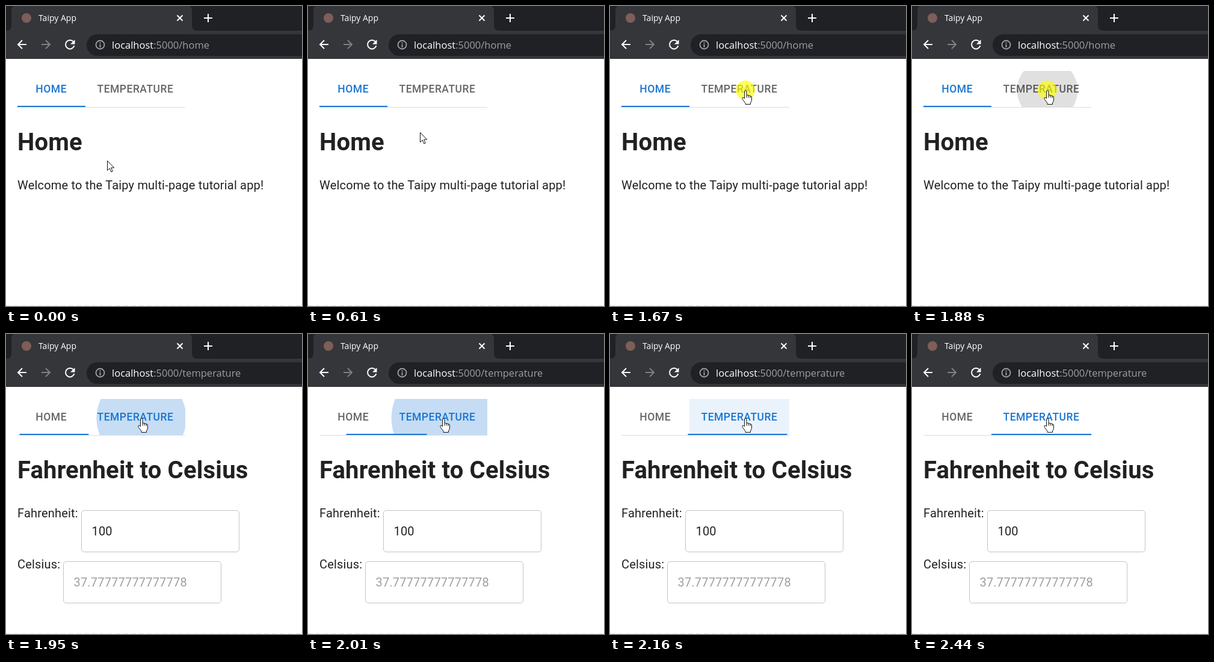
An HTML page that plays this animation: 492 px wide and 499 px high, repeating every 3630 ms.

```html
<!DOCTYPE html>
<html lang="en">
<head>
<meta charset="utf-8">
<title>Multi-page app</title>
<style>
  html, body { margin: 0; width: 100%; height: 100%; overflow: hidden; background: #fff; }
  svg { display: block; width: 492px; height: 499px; }
  text { white-space: pre; }
  .chrome { font-family: "Open Sans", "Noto Sans", sans-serif; fill: #fff; }
  .page { font: 20px Roboto, Arial, sans-serif; letter-spacing: .1875px; fill: #212121; }
  .page .title { font-size: 40px; font-weight: 700; }
  .page .muted { fill: #9e9e9e; }
  .tab { font: 500 17.5px Roboto, Arial, sans-serif; letter-spacing: .5px; }
  .line { fill: none; stroke: #fff; stroke-width: 2; }
  .field { fill: none; stroke: #c4c4c4; }
  .cursor { fill: #fff; stroke: #111; stroke-linejoin: round; }
</style>
</head>
<body>
<svg viewBox="0 0 492 499">
  <defs>
    <clipPath id="tabArea"><rect x="132" y="108" width="166" height="60"/></clipPath>
  </defs>

  <!-- browser frame -->
  <g class="chrome">
    <rect width="492" height="88" fill="#202124"/>
    <path fill="#35363a" d="M0 88V41Q9 41 9 32V8Q9 2 13 0H305Q309 2 309 8V32Q309 41 318 41H492V88Z"/>
    <circle cx="34" cy="20" r="8" fill="#7c5f58"/>
    <text x="54" y="25" font-size="14">Taipy App</text>
    <path class="line" d="M284.5 15.5l9 9m0-9l-9 9"/>
    <path class="line" stroke-width="2.5" d="M329 20h14m-7-7v14"/>
    <path class="line" d="M34 64H20m7-7l-7 7l7 7"/>
    <path class="line" style="stroke:#7f8083" d="M59 64h14m-7-7l7 7l-7 7"/>
    <path class="line" d="M111.8 59.2A7.3 7.3 0 1 0 113.4 66"/>
    <path d="M114.5 56v7.5H107Z"/>
    <rect x="134" y="47" width="400" height="36" rx="18" fill="#202124"/>
    <g fill="#9aa0a6">
      <circle cx="156.5" cy="64.5" r="7" fill="none" stroke="#9aa0a6" stroke-width="1.8"/>
      <path d="M155.5 60.5h2v2h-2zM155.5 63.7h2v5h-2z"/>
    </g>
    <text x="176" y="71" font-size="16.5">localhost<tspan id="path" fill="#9aa0a6"></tspan></text>
  </g>

  <!-- tab bar -->
  <rect x="19" y="168" width="279" height="1" fill="#dedede"/>
  <text id="homeTab" class="tab" x="49.3" y="144">HOME</text>
  <text id="tempTab" class="tab" x="151.5" y="144">TEMPERATURE</text>
  <g clip-path="url(#tabArea)"><circle id="ripple" cx="225" cy="140"/></g>
  <rect id="marker" y="166" height="2" fill="#1976d2"/>

  <g id="home" class="page">
    <text class="title" x="19" y="240">Home</text>
    <text x="19" y="305">Welcome to the Taipy multi-page tutorial app!</text>
  </g>
  <g id="temp" class="page">
    <text class="title" x="19" y="240">Fahrenheit to Celsius</text>
    <text x="19" y="305">Fahrenheit:</text>
    <rect class="field" x="125.5" y="293.5" width="262" height="69" rx="4.5"/>
    <text x="142.5" y="335">100</text>
    <text x="19" y="390">Celsius:</text>
    <rect class="field" x="95.5" y="378.5" width="262" height="69" rx="4.5"/>
    <text class="muted" x="112.5" y="420">37.77777777777778</text>
  </g>
  <path d="M0 498.5H492" stroke="#e2e2e2" stroke-dasharray="8 5"/>

  <circle id="press" cx="225" cy="140" r="16" fill="#ff0" opacity=".65"/>
  <path id="arrow" class="cursor" d="M.5 .5V16.5L4.2 13L6.8 19L9.2 18L6.7 12H11.7Z"/>
  <g id="hand" class="cursor">
    <path d="M-1.5 13V2A1.8 1.8 0 0 1 2 2V8.5Q4.2 7 5 9Q7.6 7.8 8 10Q10.5 9 10.5 12V16Q10.5 19 8.5 21V23.5H0V21.5L-4.5 15.5Q-6 13 -4.5 12.2Q-3 11.6 -1.5 14Z"/>
    <path fill="none" d="M2 8.5V12.5M5 9V12.5M8 10V13"/>
  </g>
</svg>

<script>
const LOOP = 3630;
const PRESS = 1686, RELEASE = 1917;
const MOVES = [610, 670, 740, 800, 870, 940];
// screen refresh times
const TICKS = [0, ...MOVES, 1670, 1740, 1810, 1880, 1950, 2010, 2090, 2160, 2230, 2300, 2370, 2440];

const el = id => document.getElementById(id);
const show = (id, on) => el(id).setAttribute("visibility", on ? "visible" : "hidden");
const set = (id, attrs) => {
  for (const key in attrs) el(id).setAttribute(key, attrs[key]);
};
const mix = (a, b, p) => a + (b - a) * p;

// cubic-bezier(.4, 0, .2, 1), solved by bisection
function ease(x) {
  if (x <= 0) return 0;
  if (x >= 1) return 1;
  let lo = 0, hi = 1;
  for (let i = 0; i < 24; i++) {
    const s = (lo + hi) / 2, r = 1 - s;
    if (1.2 * r * r * s + .6 * r * s * s + s * s * s < x) lo = s;
    else hi = s;
  }
  return lo * lo * (3 - 2 * lo);
}

function drawPointer(t) {
  const left = 1 - MOVES.filter(m => m <= t).length / MOVES.length;
  const x = Math.round(mix(225, 168, left ** 2.1));
  const y = Math.round(mix(139.5, 257, left ** 2.8));
  const overTab = y < 168;
  show("arrow", !overTab);
  show("hand", overTab);
  set(overTab ? "hand" : "arrow", { transform: `translate(${x} ${y})` });
  show("press", t >= 1670 && t < RELEASE);
}

function drawTabs(t) {
  const second = t >= RELEASE;
  const color = on => on ? "#1976d2" : "#666";
  show("home", !second);
  show("temp", second);
  el("path").textContent = second ? ":5000/temperature" : ":5000/home";
  set("homeTab", { fill: color(!second) });
  set("tempTab", { fill: color(second) });

  const slide = ease((t - RELEASE) / 300);
  const x = mix(19, 132, slide);
  set("marker", { x, width: mix(132, 298, slide) - x });

  const grow = ease((t - PRESS) / 550);
  const fade = 1 - ease((t - RELEASE) / 550);
  set("ripple", {
    r: 99.6 * grow,
    fill: second ? "#1976d2" : "rgba(0,0,0,.6)",
    opacity: t < PRESS ? 0 : mix(.1, .3, grow) * fade
  });
}

function draw(now) {
  const time = now % LOOP;
  const t = TICKS.filter(tick => tick <= time).pop();
  drawPointer(t);
  drawTabs(t);
}

const start = performance.now();
function loop() {
  draw(performance.now() - start);
  requestAnimationFrame(loop);
}
loop();
</script>
</body>
</html>
```
